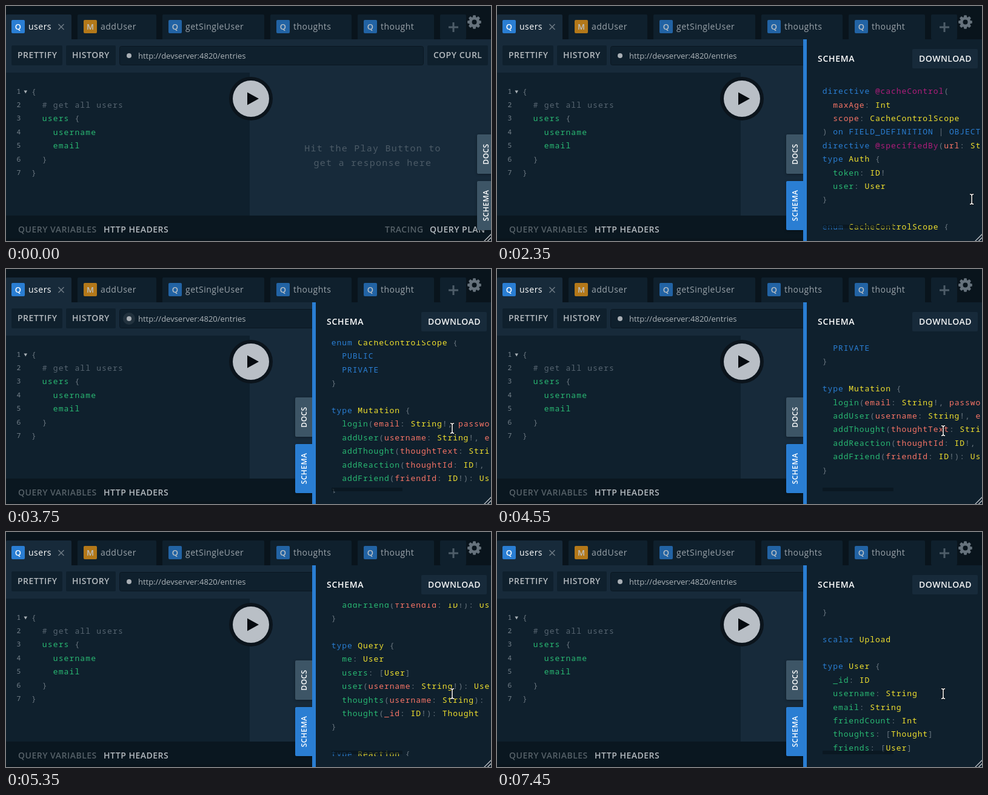
Write an HTML page that moves like this. It is 800 by 388 pixels and loops after 8 s.

```html
<!DOCTYPE html>
<html lang="en">
<head>
<meta charset="utf-8">
<title>Query editor</title>
<style>
  html, body { margin: 0; width: 100%; height: 100%; overflow: hidden; background: #09141c; }
  svg { display: block; width: 100vw; height: 100vh; }
  text { font-family: "Open Sans", sans-serif; font-size: 14px; letter-spacing: .5px; white-space: pre; }
  .b { font-weight: 600; }
  .code { font-family: "Noto Sans Mono", monospace; font-size: 13px; letter-spacing: 1.13px; }
  .sdl { letter-spacing: .91px; }
  .hint { font-size: 15px; letter-spacing: 1.25px; text-anchor: middle; }
  .num { font-size: 11.5px; letter-spacing: 0; text-anchor: end; }
  .url { font-size: 13px; letter-spacing: 0; }
  .side { font-size: 12px; letter-spacing: .45px; text-anchor: middle; }
</style>
</head>
<body>
<svg id="stage" viewBox="0 0 800 388" xmlns="http://www.w3.org/2000/svg"></svg>
<script>
const LOOP = 8000, STEP = 50, LINE = 22.4;
const navy = '#0f202d', slate = '#172a3a', blue = '#2a7ed3', green = '#29b973',
      salmon = '#f77466', yellow = '#f0e02e', magenta = '#b01d7c',
      grey = '#68747e', dim = '#566470', label = '#b4babf';

const rect = (x, y, w, h, fill, rx = 0, more = '') =>
  `<rect x="${x}" y="${y}" width="${w}" height="${h}" rx="${rx}" fill="${fill}" ${more}/>`;
const text = (x, y, str, fill, cls = '', more = '') =>
  `<text x="${x}" y="${y}" fill="${fill}" class="${cls}" ${more}>${str}</text>`;
const span = (str, fill) => `<tspan fill="${fill}">${str}</tspan>`;
const button = (x, y, w, h, str, bg, fg, pad = 10) =>
  rect(x, y, w, h, bg, 2) + text(x + pad, y + 21, str, fg, 'b');

const schema = `directive @cacheControl(
  maxAge: Int
  scope: CacheControlScope
) on FIELD_DEFINITION | OBJECT | INTERFACE
directive @specifiedBy(url: String!) on SCALAR
type Auth {
  token: ID!
  user: User
}

enum CacheControlScope {
  PUBLIC
  PRIVATE
}

type Mutation {
  login(email: String!, password: String!): Auth
  addUser(username: String!, email: String!): Auth
  addThought(thoughtText: String!): Thought
  addReaction(thoughtId: ID!, reactionBody: String!): Thought
  addFriend(friendId: ID!): User
}

type Query {
  me: User
  users: [User]
  user(username: String!): User
  thoughts(username: String): [Thought]
  thought(_id: ID!): Thought
}

type Reaction {
  _id: ID
  reactionBody: String
  createdAt: String
  username: String
}

type Thought {
  _id: ID
  thoughtText: String
  createdAt: String
  username: String
  reactionCount: Int
  reactions: [Reaction]
}

scalar Upload

type User {
  _id: ID
  username: String
  email: String
  friendCount: Int
  thoughts: [Thought]
  friends: [User]
}`.split('\n');

let depth = 0;
function paint(token) {
  if (token === '(') depth++;
  if (token === ')') depth--;
  if (/^@/.test(token)) return span(token, magenta);
  if (/^(type|enum|directive|scalar|on|[A-Z_]{3,})$/.test(token)) return span(token, blue);
  if (/^[_a-z]/.test(token)) return span(token, depth ? salmon : green);
  return span(token, /^[A-Z]/.test(token) ? yellow : grey);
}
const sdlLine = (line, i) =>
  text(536.8, 124.2 + i * LINE, (line.match(/@?\w+|[^\w@]/g) || []).map(paint).join(''), grey, 'code sdl');

function tab(x, w, name, letter, color, active) {
  const fade = active ? 1 : .72;
  return `<path d="M${x} 55V16q0-2 2-2h${w - 4}q2 0 2 2V55z" fill="${active ? slate : navy}"/>` +
    `<g opacity="${fade}">` + rect(x + (active ? 9 : 10), 23, 22, 22, color, 2) +
    text(x + (active ? 20.2 : 21.2), 39, letter, '#fff', 'b', 'text-anchor="middle" style="font-size:13px"') + '</g>' +
    text(x + (active ? 37 : 38), 39, name, active ? '#fff' : '#9aa3aa');
}

function gear(cx, cy) {
  let teeth = '';
  for (let a = 0; a < 360; a += 45)
    teeth += `<path d="M-3-7L-2-11.3H2L3-7z" transform="rotate(${a})"/>`;
  return `<g transform="translate(${cx} ${cy})" fill="#66727c">${teeth}` +
    `<circle r="6.3" fill="none" stroke="#66727c" stroke-width="4.6"/></g>`;
}

const query = [
  span('{', grey),
  span('  # get all users', dim),
  span('  users ', green) + span('{', grey),
  span('    username', green),
  span('    email', green),
  span('  }', grey),
  span('}', grey)
];

const base =
  rect(0, 0, 800, 388, '#09141c') +
  tab(0, 108, 'users', 'Q', blue, true) +
  `<path d="M86.5 30l9 9m0-9l-9 9" stroke="#6f7c86" stroke-width="1.5"/>` +
  tab(118, 130, 'addUser', 'M', '#f29b12') +
  tab(258, 168, 'getSingleUser', 'Q', blue) +
  tab(436, 134, 'thoughts', 'Q', blue) +
  tab(580, 126, 'thought', 'Q', blue) +
  rect(716, 14, 43, 41, navy, 2) +
  `<path d="M738 27v16m-8-8h16" stroke="#4e5d69" stroke-width="3"/>` +
  gear(772.5, 26.5) +
  rect(0, 55, 800, 55, slate) +
  button(9, 65, 84, 33, 'PRETTIFY', navy, label) +
  button(99, 65, 82, 33, 'HISTORY', navy, label) +
  button(695, 65, 100, 33, 'COPY CURL', navy, label) +
  rect(187.5, 66.5, 501, 31, navy, 3, 'stroke="#0a1721"') +
  '<circle id="halo" cx="203" cy="82" fill="#8b959c"/>' +
  '<circle cx="203" cy="82" r="4" fill="#a9afb5"/>' +
  text(218, 87, 'http://devserver:4820/entries', '#aeb5ba', 'url') +
  rect(0, 110, 402, 236, navy) +
  rect(402, 110, 398, 236, slate) +
  query.map((q, i) =>
    text(24.5, 144.5 + i * LINE, i + 1, '#74808a', 'code num') +
    text(42, 145.6 + i * LINE, q, grey, 'code')).join('') +
  '<path d="M29.5 139.5h5.5l-2.75 5z" fill="#a9b0b6"/>' +
  text(605, 240, 'Hit the Play Button to', '#4c5b67', 'code hint') +
  text(605, 264, 'get a response here', '#4c5b67', 'code hint') +
  '<circle cx="404" cy="153" r="36" fill="#0b141c"/><circle cx="404" cy="153" r="30" fill="#b9bfc6"/>' +
  '<path d="M398 142.5v21l19-10.5z" fill="#060b10"/>' +
  rect(0, 346, 800, 38, '#0a1720') +
  text(20, 374, 'QUERY VARIABLES', '#566168', 'b') +
  text(161, 374, 'HTTP HEADERS', label, 'b') +
  text(625, 374, 'TRACING', '#566168', 'b') +
  text(699, 374, 'QUERY PLAN', label, 'b');

const sideTab = (id, y, h, str) =>
  rect(477, y, 32, h, '#3d5566', 2, `id="${id}" style="filter:drop-shadow(0 1px 2px rgba(0,0,0,.35))"`) +
  text(0, 0, str, '#fff', 'b side', `transform="translate(496 ${y + h / 2}) rotate(-90)"`);

const panel = '<g id="panel">' +
  sideTab('docs', 212, 65, 'DOCS') + sideTab('schemaTab', 289, 81, 'SCHEMA') +
  rect(505, 55, 6, 333, blue) + rect(511, 55, 289, 333, navy) +
  text(529, 92, 'SCHEMA', '#fff', 'b', 'style="letter-spacing:.7px"') +
  button(685, 71, 108, 32, 'DOWNLOAD', slate, '#f2f4f5', 11) +
  '<g clip-path="url(#view)"><g id="sdl">' + schema.map(sdlLine).join('') + '</g></g>' +
  rect(537, 361, 117, 6, '#09141c', 1, 'opacity=".65"') + '</g>';

const pointers =
  '<g id="cursor"><path id="arrow" d="M.5.5V16.5L4.2 13 6.8 19 9.4 17.9 6.9 12H11.8z" fill="#111" stroke="#fff" stroke-width="1.1"/>' +
  '<g id="ibeam" fill="none"><path d="M-3-8.2Q0-8.2 0-6V6Q0 8.2-3 8.2M3-8.2Q0-8.2 0-6M0 6Q0 8.2 3 8.2" stroke="#000" stroke-width="3"/>' +
  '<path d="M-3-8.2Q0-8.2 0-6V6Q0 8.2-3 8.2M3-8.2Q0-8.2 0-6M0 6Q0 8.2 3 8.2" stroke="#fff" stroke-width="1.5"/></g>' +
  '<path id="hand" d="M4 11V2Q5.5-.5 7 2V8Q9 6.5 10 8.5 12 7.5 12.7 9.5 15 9 15 11V14L13 19H6L1 12Q1 9.5 4 11z" fill="#111" stroke="#fff" stroke-width="1.1"/></g>';

const $ = id => document.getElementById(id);
$('stage').innerHTML =
  '<defs><clipPath id="view"><rect x="511" y="118" width="287" height="252"/></clipPath></defs>' +
  base + panel +
  '<path d="M788.5 388.5l12-12M794 388.5l6.5-6.5" stroke="#c3c8cc" stroke-width="1.3"/>' + pointers;

// Rows are time, then values; each stretch slows to a stop when eased.
function track(rows, t, eased) {
  let i = rows.findIndex(r => r[0] > t);
  if (i < 0) return rows[rows.length - 1].slice(1);
  if (i === 0) return rows[0].slice(1);
  const a = rows[i - 1], b = rows[i];
  let k = (t - a[0]) / (b[0] - a[0]);
  if (eased) k = 1 - (1 - k) * (1 - k);
  return a.slice(1).map((v, j) => v + (b[j + 1] - v) * k);
}

const path = [
  [550, 99, 11], [1000, 670, 231], [1100, 670, 231], [1200, 729, 269], [1300, 729, 269],
  [1400, 762, 300], [1500, 762, 300], [1600, 780, 317], [1700, 780, 317], [1750, 784, 317],
  [1950, 784, 317], [2000, 789, 326], [2300, 789, 326], [2750, 736, 263], [4450, 736, 263], [4500, 736, 267]
];
const scroll = [
  [2750, -21], [3150, 0], [4050, 250], [4400, 250], [4550, 258], [5250, 440], [5300, 440],
  [5350, 447.5], [5650, 480], [5950, 480], [6350, 711.6], [6800, 860], [7450, 995.5]
];

function pointerKind(t, x) {
  if (t < 550) return '';
  if (t < 1150) return x < 440 ? 'arrow' : 'ibeam';
  if (t < 1600) return 'arrow';
  return t < 2000 ? 'hand' : 'ibeam';
}

function drawHalo(t) {
  const held = t < 2350 ? Math.min(t, 1000) : t < 4450 ? Math.min(t, 3000) : t;
  const p = (held % 2000 - 580) / 700;
  const on = p > 0 && p < 1;
  $('halo').setAttribute('r', on ? Math.min(10.5, 4 + 10 * p) : 0);
  $('halo').setAttribute('opacity', on ? .4 * (1 - p) : 0);
}

function draw(ms) {
  const t = Math.floor(ms % LOOP / STEP) * STEP;
  const open = t >= 1950;
  $('panel').setAttribute('transform', `translate(${open ? 0 : 300})`);
  $('schemaTab').setAttribute('fill', open ? blue : '#3d5566');
  $('sdl').setAttribute('transform', `translate(0 ${-track(scroll, t, true)[0]})`);
  const [x, y] = track(path, t);
  const kind = pointerKind(t, x);
  $('cursor').setAttribute('transform', `translate(${x} ${y})`);
  for (const id of ['arrow', 'ibeam', 'hand'])
    $(id).setAttribute('visibility', id === kind ? 'visible' : 'hidden');
  drawHalo(t);
}

const start = performance.now();
function tick() {
  draw(performance.now() - start);
  requestAnimationFrame(tick);
}
tick();
</script>
</body>
</html>
```
